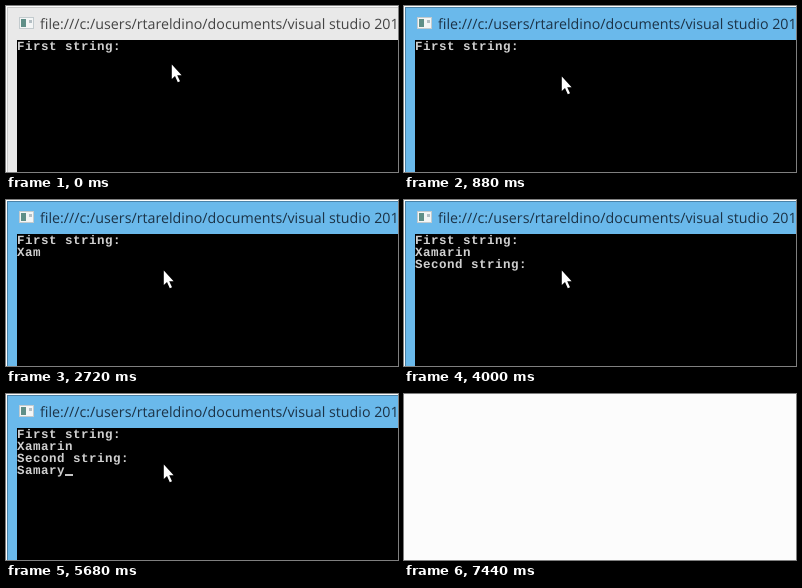
An HTML page that plays this animation: 392 px wide and 166 px high, repeating every 8 s.

```html
<!DOCTYPE html>
<html lang="en">
<head>
<meta charset="utf-8">
<title>Console session</title>
<style>
  html, body { margin: 0; width: 100%; height: 100%; overflow: hidden; background: #fcfcfc; }
  svg { display: block; width: 392px; height: 166px; }
  text { white-space: pre; text-rendering: geometricPrecision; }
  .title { font: 14.25px "Open Sans", "Noto Sans", sans-serif; }
  .console { font: bold 12.5px "Liberation Mono", monospace; letter-spacing: 0.5px; fill: #d0d0d0; }
</style>
</head>
<body>
<svg viewBox="0 0 392 166">
  <rect width="392" height="166" fill="#fcfcfc"/>
  <g id="window">
    <rect id="edge" x="1" y="1" width="391" height="165"/>
    <rect id="frame" x="2" y="2" width="390" height="164"/>
    <g id="icon">
      <rect x="13" y="11" width="15" height="12" fill="#c3cbce"/>
      <rect x="14" y="12" width="13" height="10" fill="#f4f6f6"/>
      <rect x="15" y="13" width="5" height="8" fill="#5f8f88"/>
      <rect x="23" y="14" width="3" height="3" fill="#b4bfc4"/>
    </g>
    <text id="title" class="title" x="34" y="23">file:///c:/users/rtareldino/documents/visual studio 201</text>
    <rect x="11" y="34" width="381" height="132" fill="#000"/>
    <g id="lines" class="console"></g>
    <rect id="caret" width="8" height="2" fill="#c4c4c4"/>
    <path id="pointer" d="M0.8 1.6V16L4 13L6.8 19.2L9 18.2L6.2 12.2H10.6Z" fill="#fff"/>
  </g>
</svg>
<script>
const LOOP = 8000, CLOSE = 7440;
const LEFT = 11, TOP = 34, COL = 8, ROW = 12;
const $ = id => document.getElementById(id);

// Each line lists the times at which its characters appear.
const lines = [
  { text: "First string:", at: [0] },
  { text: "Xamarin", at: [2400, 2720, 2720, 2880, 3040, 3440, 3520] },
  { text: "Second string:", at: [4000] },
  { text: "Samaryn", at: [4560, 4640, 4720, 4960, 5120, 5280, 5920] },
  { text: "Distance: 2", at: [6560] }
];
const blinks = [
  { from: 1440, to: 2000, row: 1, col: 0 },
  { from: 3600, to: 4000, row: 1, col: 7 },
  { from: 5680, to: 5920, row: 3, col: 6 },
  { from: 6240, to: 6560, row: 3, col: 7 }
];
const pointerPath = [
  { at: 0, x: 165, y: 57 },
  { at: 320, x: 161, y: 62 },
  { at: 480, x: 157, y: 69 }
];
const themes = [
  { at: 0, frame: "#e9e9e9", edge: "#c9c9c9", title: "#444" },
  { at: 880, frame: "#6ab9eb", edge: "#4a82a8", title: "#1c3347" }
];

const rows = lines.map((line, i) => {
  const el = document.createElementNS("http://www.w3.org/2000/svg", "text");
  el.setAttribute("x", LEFT);
  el.setAttribute("y", TOP + i * ROW + 10);
  return $("lines").appendChild(el);
});

const latest = (steps, t) => steps.filter(s => s.at <= t).pop();
const show = (el, on) => el.setAttribute("visibility", on ? "inherit" : "hidden");

function typed({ text, at }, t) {
  const count = at.filter(time => time <= t).length;
  return at.length === 1 ? (count ? text : "") : text.slice(0, count);
}

function render(t) {
  show($("window"), t < CLOSE);

  const theme = latest(themes, t);
  for (const part of ["frame", "edge", "title"]) {
    $(part).setAttribute("fill", theme[part]);
  }

  lines.forEach((line, i) => { rows[i].textContent = typed(line, t); });

  const blink = blinks.find(b => t >= b.from && t < b.to);
  show($("caret"), blink);
  if (blink) {
    $("caret").setAttribute("x", LEFT + blink.col * COL);
    $("caret").setAttribute("y", TOP + blink.row * ROW + 10);
  }

  const { x, y } = latest(pointerPath, t);
  $("pointer").setAttribute("transform", `translate(${x} ${y})`);
}

const start = performance.now();
function tick() {
  render((performance.now() - start) % LOOP);
  requestAnimationFrame(tick);
}
tick();
</script>
</body>
</html>
```
